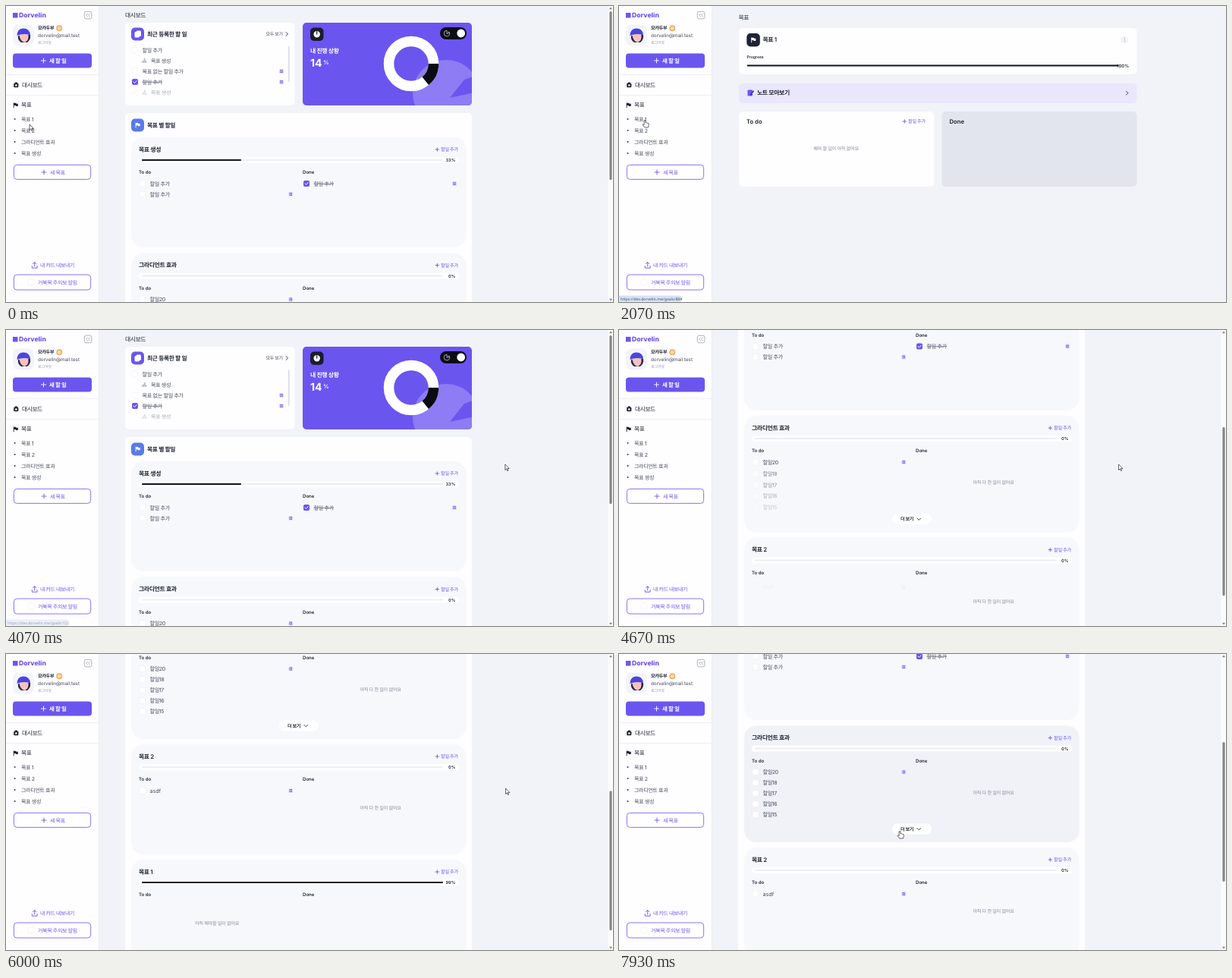
Recreate the animation shown at these times as an HTML page. Size 800 by 390 pixels, loop 8000 ms.

```html
<!DOCTYPE html>
<html lang="ko">
<head>
<meta charset="utf-8">
<title>대시보드</title>
<style>
  html, body { margin: 0; width: 100%; height: 100%; overflow: hidden; background: #f1f3f8; }
  svg { display: block; width: 100%; height: 100%; }
  text { font-family: Inter, 'Noto Sans CJK KR', 'Noto Sans CJK', sans-serif; text-rendering: geometricPrecision; white-space: pre; }
  .ko { letter-spacing: -.05em; }
  .done { text-decoration: line-through; }
  .url { font-family: 'Noto Sans', 'Open Sans', sans-serif; }
</style>
</head>
<body>
<svg id="stage" viewBox="0 0 800 390"></svg>
<script>
const LOOP = 8000;
const PURPLE = '#6b55ef', INK = '#1f2433', SLATE = '#454b5c', GRAY = '#858b99', PAPER = '#fefdff';

// Drawing helpers; text is placed by its vertical centre.
const rect = (x, y, w, h, r, fill, more = '') =>
  `<rect x="${x}" y="${y}" width="${w}" height="${h}" rx="${r}" fill="${fill}" ${more}/>`;
const circle = (x, y, r, fill, more = '') => `<circle cx="${x}" cy="${y}" r="${r}" fill="${fill}" ${more}/>`;
const line = (d, color, w = 1, more = '') =>
  `<path d="${d}" fill="none" stroke="${color}" stroke-width="${w}" stroke-linecap="round" stroke-linejoin="round" ${more}/>`;
const shape = (d, fill) => `<path d="${d}" fill="${fill}"/>`;
const text = (x, y, s, size, fill = INK, weight = 400, more = '', cls = '') =>
  `<text x="${x}" y="${y + size * .36}" font-size="${size}" fill="${fill}" font-weight="${weight}" class="${/[가-힣]/.test(s) ? 'ko' : ''} ${cls}" ${more}>${s}</text>`;
const middle = 'text-anchor="middle"', end = 'text-anchor="end"';
const plus = (x, y, r, color) => line(`M${x - r} ${y}h${2 * r}M${x} ${y - r}v${2 * r}`, color, .9);
const chevron = (x, y, color = INK) => line(`M${x - 1.2} ${y - 2.4}l2.4 2.4l-2.4 2.4`, color, .9);
const flag = (x, y, color) => line(`M${x - 2.6} ${y - 2.6}v6`, color, .9) +
  shape(`M${x - 2.6} ${y - 2.8}h2.8l.6 1h2.2v3.4h-2.6l-.6-1h-2.4z`, color);
const noteIcon = (x, y) => rect(x - 3, y - 3, 6, 6, 1.5, '#e2dcfb') +
  rect(x - 1.7, y - 2, 3.4, 4, .6, '#7c68ee') + line(`M${x - .8} ${y - .6}h1.6m-1.6 1.3h1.6`, '#fff', .5);
const checkbox = (x, y, on) => on
  ? rect(x - 4, y - 4, 8, 8, 2, PURPLE) + line(`M${x - 2} ${y}l1.5 1.5l2.6-2.8`, '#fff', 1)
  : rect(x - 3.8, y - 3.8, 7.6, 7.6, 2, '#fff', 'stroke="#ebecf3" stroke-width=".5"');
const addLink = (x, y) => plus(x + 2.3, y, 2.2, PURPLE) + text(x + 7, y, '할일 추가', 6.2, PURPLE, 500);

const item = (x, y, label, { on, note, at = 2950 } = {}) =>
  `<g class="item" data-at="${at}">${checkbox(x, y, on)}` +
  text(x + 9.5, y, label, 7.1, on ? '#5b6070' : SLATE, 400, '', on ? 'done' : '') +
  (note ? noteIcon(note, y) : '') + '</g>';
const parentGoal = y => `<g class="item" data-at="2950">` +
  line(`M180 ${y + 2.2}h4.6m-4.6 0v-1.6h4.6v1.6M182.3 ${y + .4}v-3l1.8 1`, '#9298a8', .8) +
  text(191, y, '목표 생성', 7, SLATE) + '</g>';

const bar = (id, x, y, w, labelX, size) => rect(x, y - 1, w, 2, 1, '#eceef4') +
  rect(x, y - .9, 0, 1.8, .9, '#15151f', `id="${id}Bar"`) +
  text(labelX, y, '0%', size, INK, 600, `id="${id}Pct" ${end}`);

function sidebar() {
  const goals = ['목표 1', '목표 2', '그라디언트 효과', '목표 생성'];
  return rect(0, 0, 122, 390, 0, PAPER) + line('M122.3 0V390', '#e6e8ee', .6) +
    rect(9, 9, 6.5, 6.5, 0, PURPLE) + text(17, 12.3, 'Dorvelin', 8.6, PURPLE, 800) +
    rect(103.3, 7.3, 9.6, 9.6, 2.4, '#fff', 'stroke="#8d93a3" stroke-width=".7"') +
    line('M107.6 10l-2 2l2 2m3-4l-2 2l2 2', '#70768a', .6) +
    rect(9, 24.5, 28, 28, 8, '#f3f4fb') +
    shape('M16 39q-1 6 4 9h8q5-4 4-10z', '#2b2740') + shape('M17 37h12q2 8-4 11q-6 0-8-11z', '#f5c3bd') +
    shape('M14.5 39q0-9 8-9.5q9 0 9.500 9q-9-3-17.500 .5z', '#4a45e0') +
    text(42, 29, '모카두부', 6.1, INK, 600) + circle(70.3, 29.3, 4, '#eeb068') + circle(70.3, 29.3, 2.4, '#f8dda5') +
    text(42, 38.8, 'dorvelin@mail.test', 6.3, SLATE) + text(42, 48, '로그아웃', 5.2, '#9a9fad') +
    rect(9, 62.5, 104, 19, 4, PURPLE) + plus(49.5, 72, 3, '#fff') + text(57, 72, '새 할 일', 7.5, '#fff', 600) +
    line('M0 90.5H122M0 117.500H122', '#eceef3', .8) +
    rect(10.2, 101.8, 6.2, 5.4, 1.3, INK) + rect(11.7, 100.6, 3.2, 2, .7, INK) + circle(13.3, 104.5, 1.3, '#fff') +
    text(21, 104, '대시보드', 7.7, INK, 500) + flag(12.8, 130.5, INK) + text(20, 130.5, '목표', 7.7, INK, 500) +
    goals.map((g, i) => circle(11.6, 149 + 15 * i, 1.1, SLATE) + text(20, 149 + 15 * i, g, 7, SLATE)).join('') +
    rect(10.4, 209.4, 101.200, 19, 4, '#fff', `stroke="${PURPLE}" stroke-width=".8"`) +
    plus(50, 219, 3, PURPLE) + text(58, 219, '새 목표', 7, PURPLE, 500) +
    line('M34.300 342.500v2.700h6.800v-2.700M37.700 343v-5.200m-2.200 2l2.200-2.200l2.200 2.200', PURPLE, .9) +
    text(45, 341.5, '내 카드 내보내기', 6.9, PURPLE, 500) +
    rect(10.4, 354, 101.200, 20, 4, '#fff', `stroke="${PURPLE}" stroke-width=".8"`) +
    rect(29, 360, 8, 8, 2, '#fff', 'stroke="#ececf5" stroke-width=".6"') +
    text(42, 364, '거북목 주의보 알림', 7, PURPLE, 500);
}

function recentCard() {
  return rect(157, 22, 223.5, 109, 5, PAPER) + rect(165, 28.5, 17, 17, 5, PURPLE) +
    rect(169.5, 34, 6.5, 7.5, 1.5, '#fff') + rect(171.5, 32.500, 6.5, 7.5, 1.5, '#fff') +
    text(186, 37, '최근 등록한 할 일', 7.8, INK, 600) + text(342.5, 37, '모두 보기', 6, SLATE, 500) + chevron(370.3, 37) +
    `<g clip-path="url(#listClip)">` + item(170, 58, '할일 추가') + parentGoal(72) +
    item(170, 86, '목표 없는 할일 추가', { note: 363 }) + item(170, 100, '할일 추가', { on: true, note: 363 }) +
    parentGoal(114) + '</g>' + rect(160, 98, 211, 26, 0, 'url(#fadeOut)') + rect(372, 53, 1.6, 47, .8, '#d9dbe2');
}

function progressCard() {
  return `<g clip-path="url(#panelClip)">` + rect(391, 22, 223, 109, 0, PURPLE) +
    circle(580, 115, 44, '#8d7cf4') + shape('M585 121L604 97L618 92V114z', PURPLE) + '</g>' +
    rect(401, 28.500, 17.500, 17.500, 5, '#1b1c2c') + circle(409.7, 37.2, 4.200, '#fff') +
    line('M409.700 37.200V33.500', '#1b1c2c', 1.2) +
    text(401, 59, '내 진행 상황', 7.9, '#fff', 600) +
    text(401, 75, '14', 14, '#fff', 700, 'id="total"') + text(418, 74, '%', 7.6, '#fff', 600, 'id="sign"') +
    circle(534, 76, 29.5, 'none', 'stroke="#fff" stroke-width="13.500"') +
    circle(534, 76, 29.5, 'none', 'id="slice" pathLength="100" stroke="#0b0b12" stroke-width="13.500"') +
    rect(572, 28, 35, 16, 8, '#0d0d16') + circle(599.7, 36, 5.4, '#fff') +
    line('M581 36V32.300A3.800 3.800 0 1 0 584.800 36zM582.500 34.400h2', '#fff', .6);
}

const cards = [
  { id: 'make', name: '목표 생성', top: 173, h: 145, pct: 33, at: 2835 },
  { id: 'grad', name: '그라디언트 효과', top: 325.5, h: 153.5, pct: 0, at: 0 },
  { id: 'two', name: '목표 2', top: 486, h: 145, pct: 0, at: 0 },
  { id: 'one', name: '목표 1', top: 638, h: 145, pct: 100, at: 5050 }
];
const fills = {
  make: y => item(180, y, '할일 추가') + item(180, y + 14, '할일 추가', { note: 375.3 }) +
    item(396, y, '할일 추가', { on: true, note: 591 }),
  grad: y => [20, 18, 17, 16, 15].map((n, i) =>
    item(180, y + 14 * i, '할일' + n, { note: i ? 0 : 375.3, at: i ? 4400 + 45 * i : 2950 })).join('') +
    text(493.500, y + 27, '아직 다 한 일이 없어요', 6.2, GRAY, 400, middle) +
    rect(360, y + 68, 52, 14, 7, '#fff') + text(371, y + 75, '더 보기', 6.1, INK, 600) +
    line(`M393 ${y + 74}l2.300 2.300l2.300-2.300`, INK, .9),
  two: y => item(180, y, 'asdf', { note: 375.3, at: 4650 }) +
    text(493.500, y + 23, '아직 다 한 일이 없어요', 6.2, GRAY, 400, middle),
  one: y => text(278, y + 23, '아직 해야할 일이 없어요', 6.2, GRAY, 400, middle)
};
const goalCard = ({ id, name, top, h }) => `<g id="${id}">` +
  rect(165, top, 441.5, h, 16, '#f7f8fc', `id="${id}Card"`) +
  text(175, top + 16, name, 7.9, INK, 600) + addLink(566, top + 16) +
  rect(175, top + 26, 422, 8, 4, '#fff') + bar(id, 179, top + 30, 397, 592.3, 5.6) +
  text(175, top + 46, 'To do', 6.1, INK, 600) + text(391, top + 46, 'Done', 6.1, INK, 600) +
  fills[id](top + 61) + '</g>';

const dashboard = () => `<g id="dash"><g id="page">` + text(157, 12, '대시보드', 7.8, INK, 500) +
  recentCard() + progressCard() + rect(157, 141, 457, 649, 5, PAPER, 'id="sheet"') +
  rect(165, 148.500, 17, 17, 5, '#587bea') + flag(173.700, 156.700, '#fff') + text(186, 157, '목표 별 할일', 7.8, INK, 600) +
  cards.map(goalCard).join('') + '</g>' +
  rect(793.5, 0, 6.5, 390, 0, '#fbfbfc') + rect(795.4, 7, 3.2, 222, 1.6, '#858588', 'id="thumb"') +
  shape('M795 4.200h4l-2-2.800zM795 385.800h4l-2 2.800z', '#7c7c80') + '</g>';

const goalPage = () => `<g id="goal">` + text(157.5, 15, '목표', 7.8, INK, 500) +
  rect(158, 29, 524.5, 61, 5, PAPER) + rect(168.300, 36, 17.500, 17.500, 5, '#1f2136') + flag(177.300, 44.500, '#fff') +
  text(189.5, 44.5, '목표 1', 7.9, INK, 600) + circle(666.3, 44.500, 5, '#f2f3f8') +
  [-2, 0, 2].map(d => circle(666.3, 44.500 + d, .55, '#8c92a2')).join('') +
  text(168.500, 67, 'Progress', 5.1, INK, 600) + bar('goal', 168.700, 78.500, 490, 672, 5.8) +
  rect(158, 102, 524.5, 26, 5, '#eae6fc') + rect(169.500, 110.500, 6.500, 8, 1, PURPLE) +
  line('M173.500 117l3.800-5', '#4531b4', 1.4) + text(182, 114.5, '노트 모아보기', 7.9, INK, 600) + chevron(669.7, 114.7) +
  rect(158, 139, 257, 99, 5, PAPER) + rect(425.5, 139, 257, 99, 5, '#e2e5ee') +
  text(168, 152, 'To do', 7.7, INK, 600) + addLink(374, 152) + text(435.5, 152, 'Done', 7.7, INK, 600) +
  text(286, 188, '해야 할 일이 아직 없어요', 6.2, GRAY, 400, middle) + '</g>';

const overlay = () => `<g id="status">` + rect(-1, 382, 82, 9, 1.5, '#d9e4f9', 'stroke="#b9c8e6" stroke-width=".5"') +
  text(2, 386.2, '', 5.1, '#454c5c', 400, 'id="url"', 'url') + '</g>' +
  `<path id="arrow" d="M0 0V7.500L1.800 5.900L3 8.600L4.200 8L3 5.500H5.400z" fill="#fff" stroke="#222" stroke-width=".7"/>` +
  `<path id="hand" d="M-.9 5.500V.8Q0-.6 .9 .8V3.600Q2 3 2.500 4Q3.600 3.500 4 4.500Q5.200 4.200 5.200 5.500V7.500Q5 9 4.200 10H0L-3 6.500Q-2.600 5-.9 6.500z" fill="#fff" stroke="#222" stroke-width=".7"/>`;

document.getElementById('stage').innerHTML = `<defs>
  <clipPath id="listClip"><rect x="160" y="51" width="211" height="70"/></clipPath>
  <clipPath id="panelClip"><rect x="391" y="22" width="223" height="109" rx="5"/></clipPath>
  <linearGradient id="fadeOut" x2="0" y2="1"><stop offset=".2" stop-color="${PAPER}" stop-opacity="0"/><stop offset=".95" stop-color="${PAPER}"/></linearGradient>
  </defs>` + rect(0, 0, 800, 390, 0, '#f1f3f8') + dashboard() + goalPage() + sidebar() + overlay();

const $ = id => document.getElementById(id);
const items = [...document.querySelectorAll('.item')];
const set = (id, attrs) => { for (const k in attrs) $(id).setAttribute(k, attrs[k]); };
const show = (id, on) => { $(id).style.display = on ? '' : 'none'; };
const clamp = v => Math.min(1, Math.max(0, v));
const smooth = u => u * u * (3 - 2 * u);

const GOAL_OPEN = 860, DASH_OPEN = 2800, MORE_LOADED = 5000;
const scrollKeys = [[4400, 0], [4786, 270], [5300, 270], [5700, 367], [6130, 367], [6450, 407], [7050, 407], [7550, 231]];
const mouseKeys = [[0, 31, 156], [250, 32, 148], [870, 32, 148], [1000, 36.5, 117], [1250, 42, 104], [1650, 42, 104],
  [1850, 34, 150], [2450, 34, 150], [2720, 42, 105], [3000, 42, 106], [3200, 42, 106], [3420, 60, 194],
  [3800, 657.5, 177], [4500, 658.5, 177], [7300, 658.5, 177], [7800, 370, 233]];
const links = [[150, 'goals/88#'], [1080, 'dashboard'], [1800, 'goals/88#'], [2680, 'dashboard'], [3350, 'goals/122']];

function along(keys, t) {
  const i = keys.findIndex(k => k[0] > t);
  if (i === 0) return keys[0].slice(1);
  if (i < 0) return keys[keys.length - 1].slice(1);
  const a = keys[i - 1], b = keys[i], u = smooth((t - a[0]) / (b[0] - a[0]));
  return a.slice(1).map((v, n) => v + (b[n + 1] - v) * u);
}

// Fraction of a one-second ease-out; dashboard parts are already settled at the start.
const grow = (t, at) => 1 - (1 - clamp((t - at) / 1000)) ** 3;
const onDash = (t, at) => t < GOAL_OPEN ? 1 : grow(t, at);

function setBar(id, full, pct, progress, late) {
  set(id + 'Bar', { width: full * pct / 100 * progress });
  $(id + 'Pct').textContent = Math.round(pct * late) + '%';
}

function drawMouse(t, scroll, inGoal) {
  const [x, y] = along(mouseKeys, t), docY = y + scroll;
  const overMenu = x < 100 && [[104, 7], [149, 6], [164, 6], [179, 6], [194, 6]].some(([c, r]) => Math.abs(y - c) < r);
  const overMore = !inGoal && x > 360 && x < 412 && Math.abs(docY - 461.5) < 7;
  const hand = overMenu || overMore;
  show('hand', hand);
  show('arrow', !hand);
  set(hand ? 'hand' : 'arrow', { transform: `translate(${x} ${y})` });
  for (const { id, top, h } of cards) {
    const over = x > 165 && x < 607 && docY > top && docY < top + h;
    set(id + 'Card', { fill: over ? '#f1f2f8' : '#f7f8fc' });
  }
}

function draw(t) {
  const inGoal = t >= GOAL_OPEN && t < DASH_OPEN;
  const [scroll] = along(scrollKeys, t);
  const loaded = t >= MORE_LOADED, height = loaded ? 797 : 660;
  show('dash', !inGoal);
  show('goal', inGoal);
  show('one', loaded);
  set('page', { transform: `translate(0 ${-scroll})` });
  set('sheet', { height: height - 148 });
  set('thumb', { y: 7 + scroll * 376 / height, height: 390 * 376 / height });

  for (const el of items) {
    const p = t < GOAL_OPEN ? 1 : clamp((t - el.dataset.at) / 330);
    el.setAttribute('opacity', p);
    el.setAttribute('transform', `translate(0 ${4.5 * (1 - p)})`);
  }
  for (const { id, pct, at } of cards) setBar(id, 397, pct, onDash(t, at), onDash(t, at + 170));
  setBar('goal', 490, 100, grow(t, 942), grow(t, 1112));

  const share = 14 * onDash(t, 2835), total = Math.round(share);
  $('total').textContent = total;
  set('sign', { x: total > 9 ? 418 : 411.5 });
  set('slice', { 'stroke-dasharray': `${share} 100` });

  const link = links.filter(l => l[0] <= t).pop();
  $('url').textContent = link ? 'https://dev.dorvelin.me/' + link[1] : '';
  set('status', { opacity: link ? 1 - clamp((t - 3950) / 250) : 0 });
  drawMouse(t, scroll, inGoal);
}

const startTime = performance.now();
function tick() {
  draw((performance.now() - startTime) % LOOP);
  requestAnimationFrame(tick);
}
tick();
</script>
</body>
</html>
```
